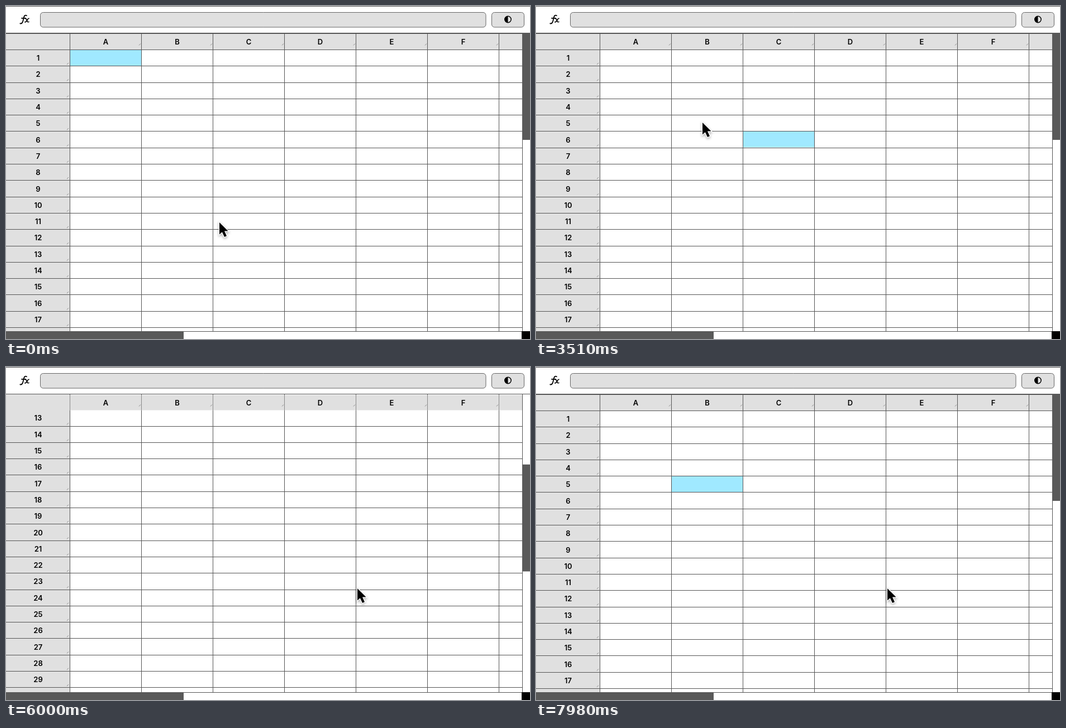
An HTML page with a canvas for the animation above (8000 ms loop, 938 px wide and 597 px high).

```html
<!DOCTYPE html>
<html lang="en">
<head>
<meta charset="utf-8">
<title>Spreadsheet</title>
<style>
html, body { margin: 0; width: 100%; height: 100%; overflow: hidden; background: #fff; }
canvas { display: block; }
</style>
</head>
<body>
<canvas id="stage" width="938" height="597"></canvas>
<script>
const ctx = document.getElementById('stage').getContext('2d');

const LOOP = 8000, WIDTH = 938, HEIGHT = 597;
const TOP = 49.1, ROW = 29.3, ROWS = 50, LEFT = 114, COL = 128;
const RIGHT = 924, BOTTOM = 583;
const LINE = '#555', GREY = '#e0e0e0', BLUE = '#a0e9ff';

// [time, x, y]
const pointerKeys = [
  [0, 382, 388], [300, 382, 388], [650, 290, 318], [850, 245, 225],
  [1100, 192, 115], [1500, 192, 115], [1750, 300, 165], [2150, 444, 241],
  [2750, 444, 241], [3350, 298, 209], [3850, 298, 209], [4150, 400, 250],
  [4560, 606, 374], [4760, 629, 397], [LOOP, 629, 397]
];
// [time, offset]
const scrollKeys = [
  [0, 0], [5340, 0], [5520, 61.7], [5900, 290], [6300, 502], [6450, 512],
  [6520, 512], [6800, 230], [7050, 22.8], [7260, 0], [LOOP, 0]
];
// [time, column, row]
const selections = [[0, 0, 1], [1250, 0, 2], [2300, 2, 6], [3550, 1, 5]];

// Monotone cubic interpolation of one value of a key list.
function sample(keys, t, i) {
  let k = 0;
  while (k < keys.length - 2 && t >= keys[k + 1][0]) k++;
  const slope = j => j < 0 || j > keys.length - 2 ? 0
    : (keys[j + 1][i] - keys[j][i]) / (keys[j + 1][0] - keys[j][0]);
  const tangent = j => {
    const a = slope(j - 1), b = slope(j);
    return a * b <= 0 ? 0 : 2 * a * b / (a + b);
  };
  const [a, b] = [keys[k], keys[k + 1]];
  const span = b[0] - a[0], u = (t - a[0]) / span, v = 1 - u;
  return a[i] * v * v * (1 + 2 * u) + b[i] * u * u * (3 - 2 * u)
    + span * u * v * (tangent(k) * v - tangent(k + 1) * u);
}

function rect(x, y, w, h, color) {
  ctx.fillStyle = color;
  ctx.fillRect(x, y, w, h);
}

function label(text, x, y) {
  ctx.font = '600 13px Inter, sans-serif';
  ctx.textAlign = 'center';
  ctx.fillStyle = '#000';
  ctx.fillText(text, x, y + 4.6);
}

function stroke(path, width, color) {
  ctx.lineWidth = width;
  ctx.strokeStyle = color;
  ctx.stroke(new Path2D(path));
}

function resizeTick(x, y) {
  stroke(`M${x - 3} ${y}l3 -3`, 1, '#888');
}

function clipped(x, y, w, h, draw) {
  ctx.save();
  ctx.beginPath();
  ctx.rect(x, y, w, h);
  ctx.clip();
  draw();
  ctx.restore();
}

function drawRows(scroll, [, selCol, selRow]) {
  rect(0, 49, LEFT, BOTTOM - 49, GREY);
  const rowTop = r => TOP + r * ROW - scroll;
  rect(LEFT + selCol * COL, Math.floor(rowTop(selRow)), COL, ROW, BLUE);
  for (let r = 0; r <= ROWS; r++) {
    const y = rowTop(r);
    if (y < 0 || y > BOTTOM) continue;
    rect(0, Math.floor(y), RIGHT, 1, LINE);
    if (!r) continue;
    label(r, 57.5, y + 15.1);
    resizeTick(112, y + 26.5);
  }
  for (let x = LEFT; x < RIGHT; x += COL) rect(x, 49, 1, BOTTOM - 49, LINE);
}

function drawHeader(scroll) {
  const moved = scroll > 0.5;
  rect(0, 50, RIGHT, moved ? 27.5 : 28, GREY);
  for (let c = 0; c < 7; c++) {
    const x = LEFT + c * COL;
    rect(x, 50, 1, 28, moved ? '#888' : LINE);
    if (c === 6) break;
    label('ABCDEF'[c], x + 64.5, 64);
    resizeTick(x + COL - 1, 70.5);
  }
}

function button(x, w) {
  ctx.beginPath();
  ctx.roundRect(x, 11.5, w, 26.5, 5);
  ctx.fillStyle = GREY;
  ctx.fill();
  ctx.lineWidth = 1;
  ctx.strokeStyle = '#666';
  ctx.stroke();
}

function drawToolbar() {
  rect(0, 0, WIDTH, 49, '#fff');
  rect(0, 0, WIDTH, 1, LINE);
  rect(0, 48, WIDTH, 1, LINE);
  button(61.5, 797.5);
  button(869.5, 58);

  ctx.lineCap = 'round';
  stroke('M37 17.2C33.5 15.2 32.2 18.5 31.4 22.5C30.4 27.5 29.4 32.6 25.3 31.3M28 21.8h7', 1.8, '#000');
  stroke('M34.3 22.6C38 21.2 36.8 30.5 41 28.4M41 22.3C38.2 21.8 37 30 33.8 28.8', 1.6, '#000');
  ctx.lineCap = 'butt';

  ctx.fillStyle = '#000';
  ctx.fill(new Path2D('M898.5 18A6 6 0 0 0 898.5 30Z'));
  ctx.beginPath();
  ctx.arc(898.5, 24, 5.7, 0, 2 * Math.PI);
  ctx.lineWidth = 1.5;
  ctx.strokeStyle = '#000';
  ctx.stroke();
}

function drawScrollbars(scroll) {
  rect(RIGHT, 49, WIDTH - RIGHT, BOTTOM - 49, '#fff');
  rect(RIGHT, 49, 1, BOTTOM - 49, LINE);
  rect(RIGHT, 48.3 + scroll * 0.358, WIDTH - RIGHT, 191.7, '#595959');
  rect(0, BOTTOM, WIDTH, HEIGHT - BOTTOM, '#fff');
  rect(0, BOTTOM, WIDTH, 1, LINE);
  rect(0, BOTTOM, 318, HEIGHT - BOTTOM, '#595959');
  rect(RIGHT - 1, BOTTOM, WIDTH - RIGHT + 1, HEIGHT - BOTTOM, '#000');
}

function drawPointer(x, y) {
  const arrow = new Path2D('M0 0V21.5L4.9 17.2L9 26L13 24.2L9 15.6H15.6Z');
  ctx.save();
  ctx.translate(x, y);
  ctx.save();
  ctx.shadowColor = 'rgba(0,0,0,.35)';
  ctx.shadowBlur = 4;
  ctx.shadowOffsetY = 2;
  ctx.lineWidth = 2.6;
  ctx.strokeStyle = '#fff';
  ctx.stroke(arrow);
  ctx.restore();
  ctx.fillStyle = '#000';
  ctx.fill(arrow);
  ctx.restore();
}

function draw(now) {
  const t = now % LOOP;
  const scroll = sample(scrollKeys, t, 1);
  const selected = selections.findLast(s => t >= s[0]);
  rect(0, 0, WIDTH, HEIGHT, '#fff');
  drawToolbar();
  clipped(0, 49, RIGHT, BOTTOM - 49, () => {
    drawRows(scroll, selected);
    drawHeader(scroll);
  });
  drawScrollbars(scroll);
  drawPointer(sample(pointerKeys, t, 1), sample(pointerKeys, t, 2));
}

const start = performance.now();
function frame() {
  draw(performance.now() - start);
  requestAnimationFrame(frame);
}
frame();
</script>
</body>
</html>
```
